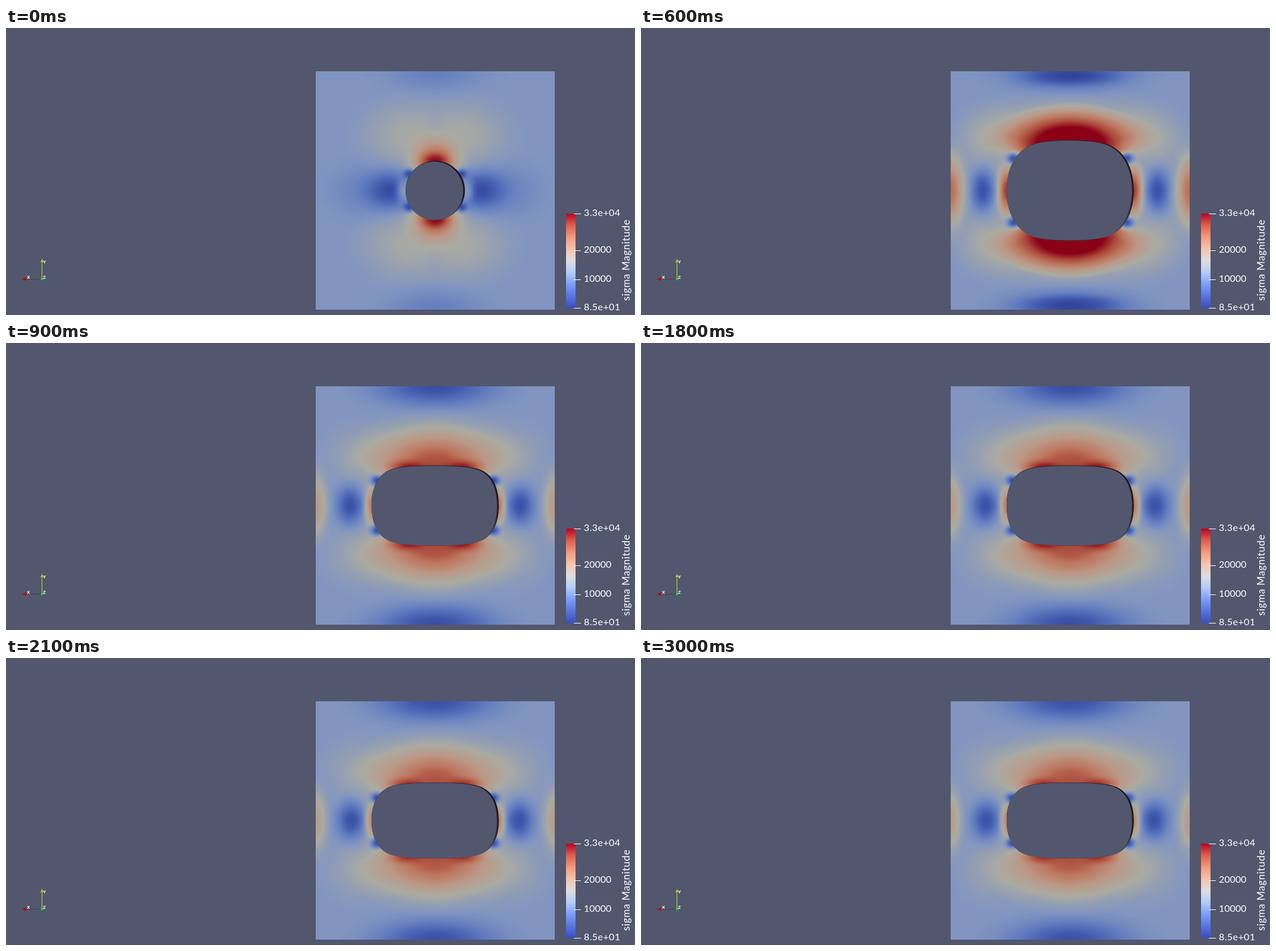
Recreate the animation shown at these times as an HTML page without scripts. Size 1058 by 484 pixels, loop 3300 ms.

```html
<!DOCTYPE html>
<html lang="en">
<head>
<meta charset="utf-8">
<title>Stress around a hole</title>
<style>
html, body { margin: 0; width: 100%; height: 100%; overflow: hidden; background: #52576e; }
body > svg { display: block; width: 1058px; height: 484px; }
.base { fill: #5f5f5f; }
.hot { fill: url(#hot); }
.cap { fill: url(#cap); }
.cold { fill: url(#cold); }
.mid { fill: url(#mid); }
.wall { fill: url(#wall); }
.back { fill: #52576e; }
text { fill: #fff; font: 16px Lato, sans-serif; }
.wide { letter-spacing: .4px; }
.title { font-size: 17px; letter-spacing: .65px; }
.axes text { font: bold 8px "Liberation Sans", sans-serif; }

/* opaque states are stacked; each one hides to uncover the next */
.until300 { animation: hide300 3.3s step-end infinite; }
.until600 { animation: hide600 3.3s step-end infinite; }
.until900 { animation: hide900 3.3s step-end infinite; }
.until2100 { animation: hide2100 3.3s step-end infinite; }
.sink { animation: sink 3.3s step-end infinite; }
@keyframes hide300 { 9.0909%, 100% { visibility: hidden; } }
@keyframes hide600 { 18.1818%, 100% { visibility: hidden; } }
@keyframes hide900 { 27.2727%, 100% { visibility: hidden; } }
@keyframes hide2100 { 63.6363%, 100% { visibility: hidden; } }
@keyframes sink { 18.1818%, 100% { transform: translateY(-2.5px); } }
</style>
</head>
<body>
<svg viewBox="0 0 1058 484">
<defs>
  <radialGradient id="hot">
    <stop stop-color="#fff"/>
    <stop offset=".2" stop-color="#fff" stop-opacity=".88"/>
    <stop offset=".4" stop-color="#fff" stop-opacity=".6"/>
    <stop offset=".6" stop-color="#fff" stop-opacity=".3"/>
    <stop offset=".8" stop-color="#fff" stop-opacity=".09"/>
    <stop offset="1" stop-color="#fff" stop-opacity="0"/>
  </radialGradient>
  <radialGradient id="cold">
    <stop stop-color="#000"/>
    <stop offset=".2" stop-color="#000" stop-opacity=".88"/>
    <stop offset=".4" stop-color="#000" stop-opacity=".6"/>
    <stop offset=".6" stop-color="#000" stop-opacity=".3"/>
    <stop offset=".8" stop-color="#000" stop-opacity=".09"/>
    <stop offset="1" stop-color="#000" stop-opacity="0"/>
  </radialGradient>
  <radialGradient id="mid">
    <stop stop-color="#6a6a6a"/>
    <stop offset=".4" stop-color="#6a6a6a" stop-opacity=".65"/>
    <stop offset=".7" stop-color="#6a6a6a" stop-opacity=".2"/>
    <stop offset="1" stop-color="#6a6a6a" stop-opacity="0"/>
  </radialGradient>
  <radialGradient id="cap">
    <stop offset=".4" stop-color="#fff"/>
    <stop offset=".5" stop-color="#fff" stop-opacity=".8"/>
    <stop offset=".65" stop-color="#fff" stop-opacity=".5"/>
    <stop offset=".82" stop-color="#fff" stop-opacity=".2"/>
    <stop offset="1" stop-color="#fff" stop-opacity="0"/>
  </radialGradient>
  <linearGradient id="wall" x2="0" y2="1">
    <stop stop-color="#14131a"/>
    <stop offset=".65" stop-color="#261e26"/>
    <stop offset=".95" stop-color="#5c5a64"/>
    <stop offset="1" stop-color="#3a2028"/>
  </linearGradient>
  <linearGradient id="scale" x2="0" y2="1">
    <stop stop-color="#b40426"/>
    <stop offset=".125" stop-color="#de604d"/>
    <stop offset=".25" stop-color="#f49a7b"/>
    <stop offset=".375" stop-color="#f4c4ad"/>
    <stop offset=".5" stop-color="#ddd"/>
    <stop offset=".625" stop-color="#b2ccfb"/>
    <stop offset=".75" stop-color="#7b9ff9"/>
    <stop offset=".875" stop-color="#5775e1"/>
    <stop offset="1" stop-color="#3b4cc0"/>
  </linearGradient>

  <!-- grey level to diverging blue-red colour -->
  <filter id="map" filterUnits="userSpaceOnUse" x="-201" y="-201" width="402" height="402" color-interpolation-filters="sRGB">
    <feComponentTransfer>
      <feFuncR type="table" tableValues=".18 .263 .377 .51 .67 .74 .741 .675 .545"/>
      <feFuncG type="table" tableValues=".23 .357 .483 .587 .67 .595 .467 .292 0"/>
      <feFuncB type="table" tableValues=".58 .685 .75 .755 .635 .525 .373 .234 .09"/>
    </feComponentTransfer>
  </filter>

  <!-- one quadrant of each stress field, measured from the hole centre -->
  <symbol id="qA" viewBox="0 0 201 201">
    <rect class="base" width="201" height="201"/>
    <ellipse class="hot" cx="38" cy="92" rx="135" ry="95" fill-opacity=".2"/>
    <ellipse class="cold" cx="0" cy="201" rx="130" ry="55" fill-opacity=".28"/>
    <ellipse class="cold" cx="110" cy="0" rx="105" ry="72" fill-opacity=".28"/>
    <ellipse class="cold" cx="76" cy="0" rx="62" ry="50" fill-opacity=".8"/>
    <ellipse class="hot" cx="0" cy="48" rx="60" ry="58" fill-opacity=".75"/>
    <ellipse class="hot" cx="0" cy="50" rx="36" ry="20" fill-opacity=".95"/>
    <ellipse class="mid" cx="50" cy="0" rx="22" ry="32"/>
    <ellipse class="cold" cx="44" cy="28" rx="17" ry="14" fill-opacity=".85"/>
  </symbol>
  <symbol id="qB" viewBox="0 0 201 201">
    <rect class="base" width="201" height="201"/>
    <ellipse class="hot" cx="125" cy="88" rx="105" ry="85" fill-opacity=".18"/>
    <ellipse class="hot" cx="0" cy="80" rx="200" ry="105" fill-opacity=".42"/>
    <ellipse class="cap sink" cx="0" cy="78" rx="140" ry="72"/>
    <ellipse class="mid" cx="116" cy="48" rx="54" ry="46" fill-opacity=".85"/>
    <ellipse class="cold" cx="0" cy="201" rx="165" ry="50" fill-opacity=".8"/>
    <ellipse class="cold" cx="0" cy="191" rx="115" ry="20" fill-opacity=".65"/>
    <ellipse class="cold" cx="147" cy="0" rx="31" ry="60" fill-opacity=".78"/>
    <ellipse class="hot" cx="203" cy="0" rx="40" ry="95" fill-opacity=".68"/>
    <ellipse class="hot" cx="106" cy="0" rx="25" ry="62" fill-opacity=".88"/>
    <ellipse class="cold" cx="95" cy="54" rx="20" ry="16" fill-opacity=".85"/>
  </symbol>
  <symbol id="qD" viewBox="0 0 201 201">
    <rect class="base" width="201" height="201"/>
    <ellipse class="hot" cx="115" cy="85" rx="110" ry="85" fill-opacity=".15"/>
    <ellipse class="hot" cx="0" cy="65" rx="160" ry="104" fill-opacity=".83"/>
    <ellipse class="hot" cx="46" cy="65" rx="48" ry="18" fill-opacity=".85"/>
    <ellipse class="mid" cx="122" cy="38" rx="52" ry="44" fill-opacity=".75"/>
    <ellipse class="cold" cx="0" cy="201" rx="165" ry="54" fill-opacity=".82"/>
    <ellipse class="cold" cx="143" cy="0" rx="38" ry="56" fill-opacity=".79"/>
    <ellipse class="hot" cx="203" cy="0" rx="34" ry="88" fill-opacity=".42"/>
    <ellipse class="hot" cx="106" cy="0" rx="20" ry="46" fill-opacity=".6"/>
    <ellipse class="cold" cx="97" cy="42" rx="19" ry="15" fill-opacity=".88"/>
  </symbol>
  <symbol id="qE" viewBox="0 0 201 201">
    <rect class="base" width="201" height="201"/>
    <ellipse class="hot" cx="115" cy="84" rx="110" ry="85" fill-opacity=".15"/>
    <ellipse class="hot" cx="0" cy="62" rx="158" ry="104" fill-opacity=".8"/>
    <ellipse class="hot" cx="48" cy="62" rx="46" ry="16" fill-opacity=".68"/>
    <ellipse class="mid" cx="122" cy="36" rx="52" ry="44" fill-opacity=".75"/>
    <ellipse class="cold" cx="0" cy="201" rx="165" ry="54" fill-opacity=".79"/>
    <ellipse class="cold" cx="141" cy="0" rx="39" ry="55" fill-opacity=".79"/>
    <ellipse class="hot" cx="203" cy="0" rx="33" ry="85" fill-opacity=".38"/>
    <ellipse class="hot" cx="106" cy="0" rx="19" ry="43" fill-opacity=".53"/>
    <ellipse class="cold" cx="97" cy="38" rx="19" ry="15" fill-opacity=".88"/>
  </symbol>

  <circle id="round" r="50"/>
  <path id="tall" d="M107 0C107 28 98 60 72 75 55 85 25 86.5 0 86.5-25 86.5-55 85-72 75-98 60-107 28-107 0-107-28-98-60-72-75-55-85-25-86.5 0-86.5 25-86.5 55-85 72-75 98-60 107-28 107 0z"/>
  <path id="flat" d="M107 0C107 25 100 45 84 56 70 66 40 67.5 0 67.5-40 67.5-70 66-84 56-100 45-107 25-107 0-107-25-100-45-84-56-70-66-40-67.5 0-67.5 40-67.5 70-66 84-56 100-45 107-25 107 0z"/>
</defs>

<g transform="translate(722 274)">
  <g>
    <g filter="url(#map)">
      <use href="#qE" width="201" height="201"/>
      <use href="#qE" width="201" height="201" transform="scale(-1 1)"/>
      <use href="#qE" width="201" height="201" transform="scale(1 -1)"/>
      <use href="#qE" width="201" height="201" transform="scale(-1 -1)"/>
    </g>
    <g transform="scale(1 .948)">
      <use href="#flat" class="wall"/>
      <use href="#flat" class="back" transform="translate(-1.5 .3) scale(.986 .995)"/>
    </g>
  </g>

  <g class="until2100">
    <g filter="url(#map)">
      <use href="#qD" width="201" height="201"/>
      <use href="#qD" width="201" height="201" transform="scale(-1 1)"/>
      <use href="#qD" width="201" height="201" transform="scale(1 -1)"/>
      <use href="#qD" width="201" height="201" transform="scale(-1 -1)"/>
    </g>
    <use href="#flat" class="wall"/>
    <use href="#flat" class="back" transform="translate(-1.5 .3) scale(.986 .995)"/>
  </g>

  <g class="until900">
    <g filter="url(#map)">
      <use href="#qB" width="201" height="201"/>
      <use href="#qB" width="201" height="201" transform="scale(-1 1)"/>
      <use href="#qB" width="201" height="201" transform="scale(1 -1)"/>
      <use href="#qB" width="201" height="201" transform="scale(-1 -1)"/>
    </g>
    <g transform="scale(1 .98)">
      <use href="#tall" class="wall"/>
      <use href="#tall" class="back" transform="translate(-1.5 0) scale(.986 .993)"/>
    </g>
  </g>
  <g class="until600">
    <use href="#tall" class="wall"/>
    <use href="#tall" class="back" transform="translate(-1.5 0) scale(.986 .993)"/>
  </g>

  <g class="until300">
    <g filter="url(#map)">
      <use href="#qA" width="201" height="201"/>
      <use href="#qA" width="201" height="201" transform="scale(-1 1)"/>
      <use href="#qA" width="201" height="201" transform="scale(1 -1)"/>
      <use href="#qA" width="201" height="201" transform="scale(-1 -1)"/>
    </g>
    <use href="#round" class="wall"/>
    <use href="#round" class="back" transform="translate(-1.5 .6) scale(.97 .988)"/>
  </g>
</g>

<g class="legend">
  <rect x="942" y="313" width="16" height="159" fill="url(#scale)"/>
  <path d="M955 313.5h12M955 375.5h12M955 424.5h12M955 472.5h12" stroke="#fff"/>
  <text class="wide" x="972" y="317">3.3e+04</text>
  <text x="972" y="379">20000</text>
  <text x="972" y="428">10000</text>
  <text class="wide" x="972" y="476">8.5e+01</text>
  <text class="title" transform="translate(1049 460) rotate(-90)">sigma Magnitude</text>
</g>

<g class="axes">
  <path d="M34 423.5H60" stroke="#4b3c4c"/>
  <path d="M60.5 396V423" stroke="#d8d820"/>
  <path d="M60.5 389l2.5 7h-5z" fill="#c8c820"/>
  <path d="M58 396h5" stroke="#55551a"/>
  <path d="M27 423.5l7-3v6z" fill="#c00000"/>
  <circle cx="60.5" cy="423.5" r="2" fill="#0e0"/>
  <text x="62" y="397">Y</text>
  <text x="35" y="423">X</text>
  <text x="62" y="423">Z</text>
</g>
</svg>
</body>
</html>
```
